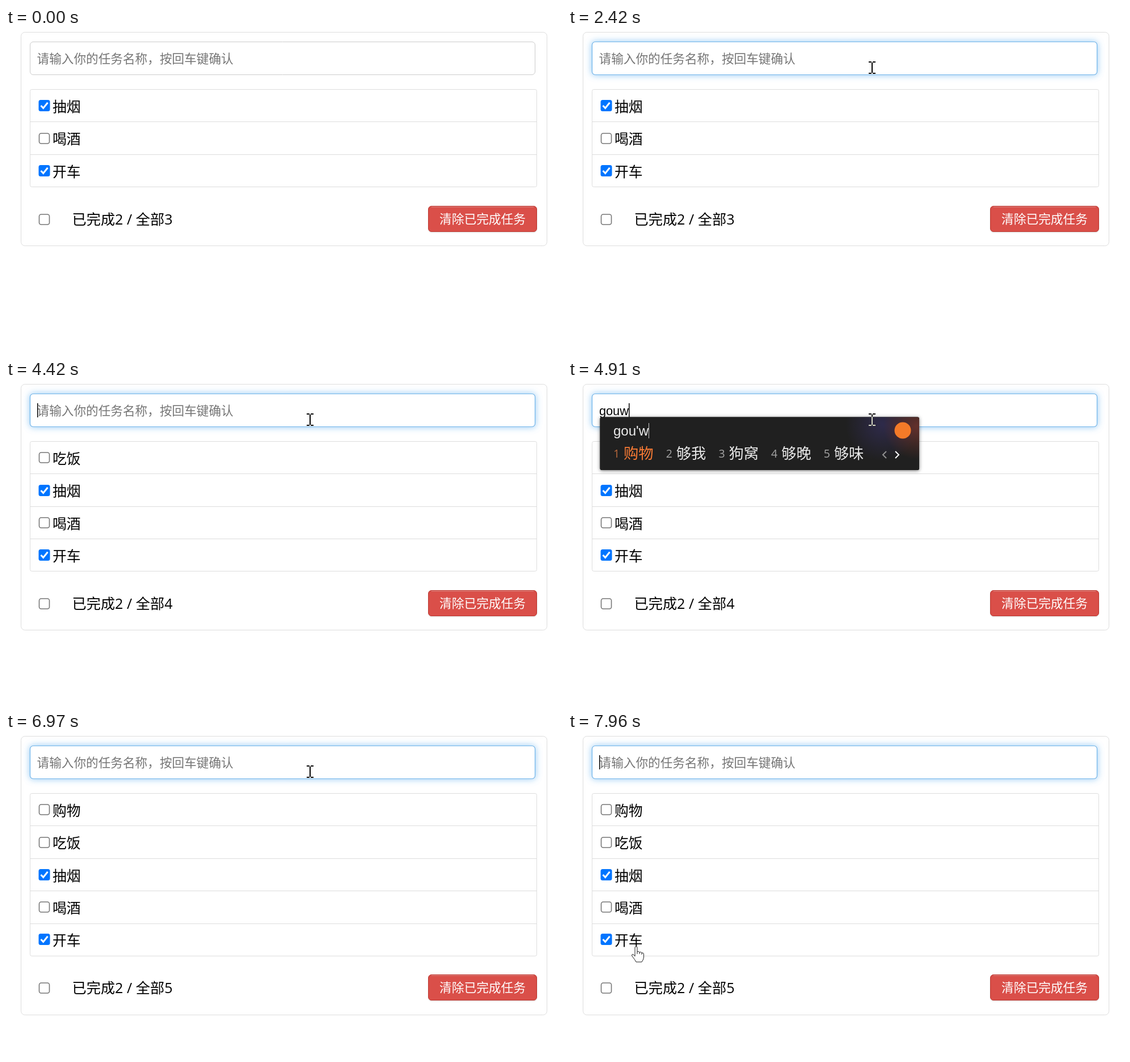
These frames come from a looping animation (980 by 572 pixels, 7990 ms). An HTML page with a canvas:

```html
<!DOCTYPE html>
<html lang="zh-CN">
<head>
<meta charset="utf-8">
<title>任务列表</title>
<style>
html, body { margin: 0; width: 100%; height: 100%; overflow: hidden; background: #fff; }
canvas { display: block; width: 980px; height: 572px; }
</style>
</head>
<body>
<canvas id="stage" width="980" height="572"></canvas>
<script>
const ctx = document.getElementById('stage').getContext('2d');
const LOOP = 7990;
const ROW = 57.4;
const UI = '"Open Sans", "Noto Sans CJK SC", "Noto Sans CJK", sans-serif';
const ARIAL = '"Liberation Sans", Arial, "Noto Sans CJK SC", sans-serif';
const KAOMOJI = '(❛ᴗ❛)';
const STEP = 40.7;

const baseTasks = [['抽烟', true], ['喝酒', false], ['开车', true]];

// Typed text: [start, input, composition, candidates]
const typing = [
  [0, ''],
  [2750, 'c', 'c', ['出', '从', '才', '错', '吃']],
  [2830, 'ch', 'ch', ['吃', '出', '长', '车', '处']],
  [2910, 'chi', 'chi', ['吃', '尺', '迟', '池', '持']],
  [2990, 'chif', "chi'f", ['吃饭', '赤峰', '吃法', KAOMOJI, 'chiffon']],
  [3370, '吃饭'],
  [4120, ''],
  [4670, 'g', 'g', ['个', '给', '跟', '更', '高']],
  [4750, 'go', 'go', ['狗', '够', '购', '构', '沟']],
  [4830, 'gou', 'gou', ['够', '狗', '购', '构', '沟']],
  [4910, 'gouw', "gou'w", ['购物', '够我', '狗窝', '够晚', '够味']],
  [4990, 'gouwu', "gou'wu", ['购物', '购屋', '购', '够', '狗']],
  [5320, '购物'],
  [6170, '']
];

const caretSpans = [[1710, 2420], [2750, 3900], [4420, 5870], [6420, 6970], [7500, LOOP]];

// Pointer keys: [start, x, y]
const pointerKeys = [
  [1380, 540, 187], [1420, 539, 146], [1460, 538, 106], [1500, 537, 78], [1540, 536, 70],
  [7250, 515, 80], [7293, 445, 122], [7336, 360, 190], [7379, 275, 260],
  [7422, 205, 325], [7465, 158, 385], [7508, 138, 425], [7550, 133, 403],
  [7910, 130, 398], [7960, 120, 378]
];

const lastBefore = (keys, t) => keys.filter(k => k[0] <= t).pop();
const rowTop = i => 108.5 + ROW * i;
const crisp = y => Math.floor(y) + 0.5;

function text(str, x, y, size, color, family = UI, align = 'left') {
  ctx.font = `${size}px ${family}`;
  ctx.fillStyle = color;
  ctx.textAlign = align;
  ctx.fillText(str, x, y);
  return ctx.measureText(str).width;
}

function box(x, y, w, h, r, fill, stroke, line = 1) {
  ctx.beginPath();
  ctx.roundRect(x, y, w, h, r);
  if (fill) { ctx.fillStyle = fill; ctx.fill(); }
  if (stroke) { ctx.strokeStyle = stroke; ctx.lineWidth = line; ctx.stroke(); }
}

function path(points, color, width) {
  ctx.beginPath();
  points.forEach(([x, y]) => ctx.lineTo(x, y));
  ctx.strokeStyle = color;
  ctx.lineWidth = width;
  ctx.stroke();
}

function shadowed(color, blur, dy, draw) {
  ctx.save();
  ctx.shadowColor = color;
  ctx.shadowBlur = blur;
  ctx.shadowOffsetY = dy;
  draw();
  ctx.restore();
}

function checkbox(y, checked) {
  if (!checked) return box(58.5, y - 9, 18, 18, 3.5, '#fff', '#767676', 1.6);
  box(57.5, y - 10, 20, 20, 3.5, '#0075ff');
  path([[61.5, y], [65.7, y + 4.4], [73.5, y - 5.2]], '#fff', 3);
}

function dangerButton(x, y, w, h, label) {
  shadowed('rgba(0,0,0,.08)', 2, 1.5, () => box(x, y, w, h, 5.5, '#da4f49', '#bd362f'));
  path([[x + 5, y + 1.3], [x + w - 5, y + 1.3]], 'rgba(255,255,255,.25)', 1.5);
  text(label, x + w / 2, y + h / 2 + 8, 21.7, '#fff', UI, 'center');
}

function inputBox(t, value) {
  const glow = Math.max(0, Math.min(1, (t - 1660) / 300));
  const draw = () => box(42.5, 24.5, 890, 58, 5.5, '#fff', '#ccc');
  if (glow) {
    shadowed(`rgba(82,168,236,${0.6 * glow})`, 12, 0, draw);
    box(42.5, 24.5, 890, 58, 5.5, '#fff', `rgba(82,168,236,${0.8 * glow})`, 1.2);
  } else draw();

  let width = 0;
  if (value) width = text(value, 55, 61.5, 21.7, '#000', ARIAL);
  else text('请输入你的任务名称，按回车键确认', 54.5, 62, 21.65, '#757575');
  if (caretSpans.some(([a, b]) => t >= a && t < b)) {
    ctx.fillStyle = '#000';
    ctx.fillRect(Math.round(55 + width), 41, 1.5, 25);
  }
}

function taskList(tasks, hovered) {
  const n = tasks.length;
  box(42.5, 108.5, 893, Math.floor(ROW * n), 3, '#fff', '#ddd');
  tasks.forEach(([name, done], i) => {
    const y = rowTop(i);
    if (i === hovered) {
      ctx.fillStyle = '#ddd';
      ctx.fillRect(43, y, 892, ROW);
      dangerButton(844.5, crisp(y + 5), 83, 46, '删除');
    }
    if (i) path([[43, crisp(y)], [935, crisp(y)]], '#ddd', 1);
    checkbox(Math.round(137.4 + 57.25 * i), done);
    text(name, 82, Math.round(148 + 57.3 * i), 24.8, '#000');
  });
}

function footer(tasks) {
  const shift = Math.round((tasks.length - 3) * 57.2);
  const done = tasks.filter(task => task[1]).length;
  checkbox(338 + shift, false);
  text(`已完成${done} / 全部${tasks.length}`, 116.5, 347 + shift, 25.2, '#000');
  dangerButton(744.5, 314.5 + shift, 191, 45, '清除已完成任务');
}

function kaomoji(x) {
  const color = '#e8e8e8';
  [3, 16].forEach(dx => {
    ctx.beginPath();
    ctx.moveTo(x + dx, 120);
    ctx.quadraticCurveTo(x + dx + 8, 126, x + dx + 7, 139);
    ctx.strokeStyle = color;
    ctx.lineWidth = 2;
    ctx.stroke();
  });
  text('(', x + 30, 138, 26, color);
  text(')', x + 71, 138, 26, color);
  [39, 64].forEach(dx => text('❛', x + dx, 141, 22, color, '"DejaVu Sans", sans-serif'));
  ctx.beginPath();
  ctx.arc(x + 55, 130, 6, 0.1, Math.PI - 0.1);
  ctx.lineWidth = 2.4;
  ctx.stroke();
}

function candidateWidth(word) {
  if (word === KAOMOJI) return 81;
  if (/^[a-z]/.test(word)) return 85;
  return word.length * 26;
}

function popup(composition, words) {
  const end = words.reduce((x, w) => x + STEP + candidateWidth(w), 81) - 22.5;
  const right = Math.round(end + 97);
  const panel = () => box(56.5, 65.5, right - 56.5, 93.5, 3, '#202020');
  shadowed('rgba(0,0,0,.55)', 6, 1, panel);

  ctx.save();
  panel();
  ctx.clip();
  [[right - 65, 78, 65, '50,45,85'], [right - 5, 82, 58, '115,52,45']].forEach(([x, y, r, rgb]) => {
    const g = ctx.createRadialGradient(x, y, 0, x, y, r);
    g.addColorStop(0, `rgba(${rgb},.8)`);
    g.addColorStop(1, `rgba(${rgb},0)`);
    ctx.fillStyle = g;
    ctx.fillRect(x - r, y - r, 2 * r, 2 * r);
  });
  ctx.restore();

  ctx.beginPath();
  ctx.arc(right - 29, 89, 14.5, 0, 7);
  ctx.fillStyle = '#f47a28';
  ctx.fill();

  const w = text(composition, 80, 98, 24, '#eee', ARIAL);
  ctx.fillStyle = '#ccc';
  ctx.fillRect(Math.round(80 + w), 76, 1, 27);

  let x = 81;
  words.forEach((word, i) => {
    text(i + 1, x - 1, 136.5, 19.5, i ? '#a5a5a5' : '#b9693c');
    if (word === KAOMOJI) kaomoji(x + 17);
    else text(word, x + 17, word.length > 2 ? 137.5 : 139, 26.3, i ? '#e8e8e8' : '#f97b35');
    x += STEP + candidateWidth(word);
  });
  const chevron = (cx, dir, color) =>
    path([[cx - 3 * dir, 126], [cx + 3 * dir, 132], [cx - 3 * dir, 138]], color, 2);
  chevron(right - 61, -1, '#909090');
  chevron(right - 39, 1, '#fff');
}

// The text beam inverts whatever lies below it.
function beam(x, y) {
  ctx.save();
  ctx.globalCompositeOperation = 'difference';
  ctx.fillStyle = '#fff';
  ctx.fillRect(x - 1, y - 9, 2, 18);
  [y - 11, y + 9].forEach(top => {
    ctx.fillRect(x - 6, top, 5, 2);
    ctx.fillRect(x + 1, top, 5, 2);
  });
  ctx.restore();
}

function outlined(shape, x, y) {
  ctx.save();
  ctx.translate(x, y);
  const p = new Path2D(shape);
  ctx.fillStyle = '#fff';
  ctx.fill(p);
  ctx.strokeStyle = '#222';
  ctx.lineWidth = 1;
  ctx.stroke(p);
  ctx.restore();
}

const ARROW = 'M0 0V25L6 19.5L10 28.5L14 27L10.2 18H18Z';
const HAND = 'M-2 2Q0-1 2 2V10Q5 8 6 11Q9 9 10 12Q13 11 13.5 14V20Q13 24 10 28H0' +
  'Q-2 24-6 19Q-9 15-6 14.5Q-4 14.5-2 18ZM2 10V14M6 11V14M10 12V15';

function pointer(t) {
  const key = lastBefore(pointerKeys, t);
  if (!key) return;
  const [, x, y] = key;
  if (y < 83) beam(x, y);
  else outlined(t >= 7960 ? HAND : ARROW, x, y);
}

// The row highlight follows the pointer slightly late.
function hoveredRow(t) {
  if (t < 7293) return -1;
  const y = lastBefore(pointerKeys, t - 45)[2];
  return Math.floor((y - 108.5) / ROW);
}

function draw(t) {
  ctx.fillStyle = '#fff';
  ctx.fillRect(0, 0, 980, 572);
  const tasks = [...baseTasks];
  if (t >= 4120) tasks.unshift(['吃饭', false]);
  if (t >= 6170) tasks.unshift(['购物', false]);
  const [, value, composition, words] = lastBefore(typing, t);

  box(26.5, 7.5, 927, 377 + Math.round((tasks.length - 3) * 57.3), 7, null, '#ddd');
  inputBox(t, value);
  taskList(tasks, hoveredRow(t));
  footer(tasks);
  if (words) popup(composition, words);
  pointer(t);
}

const start = performance.now();
function tick() {
  draw((performance.now() - start) % LOOP);
  requestAnimationFrame(tick);
}
tick();
</script>
</body>
</html>
```
